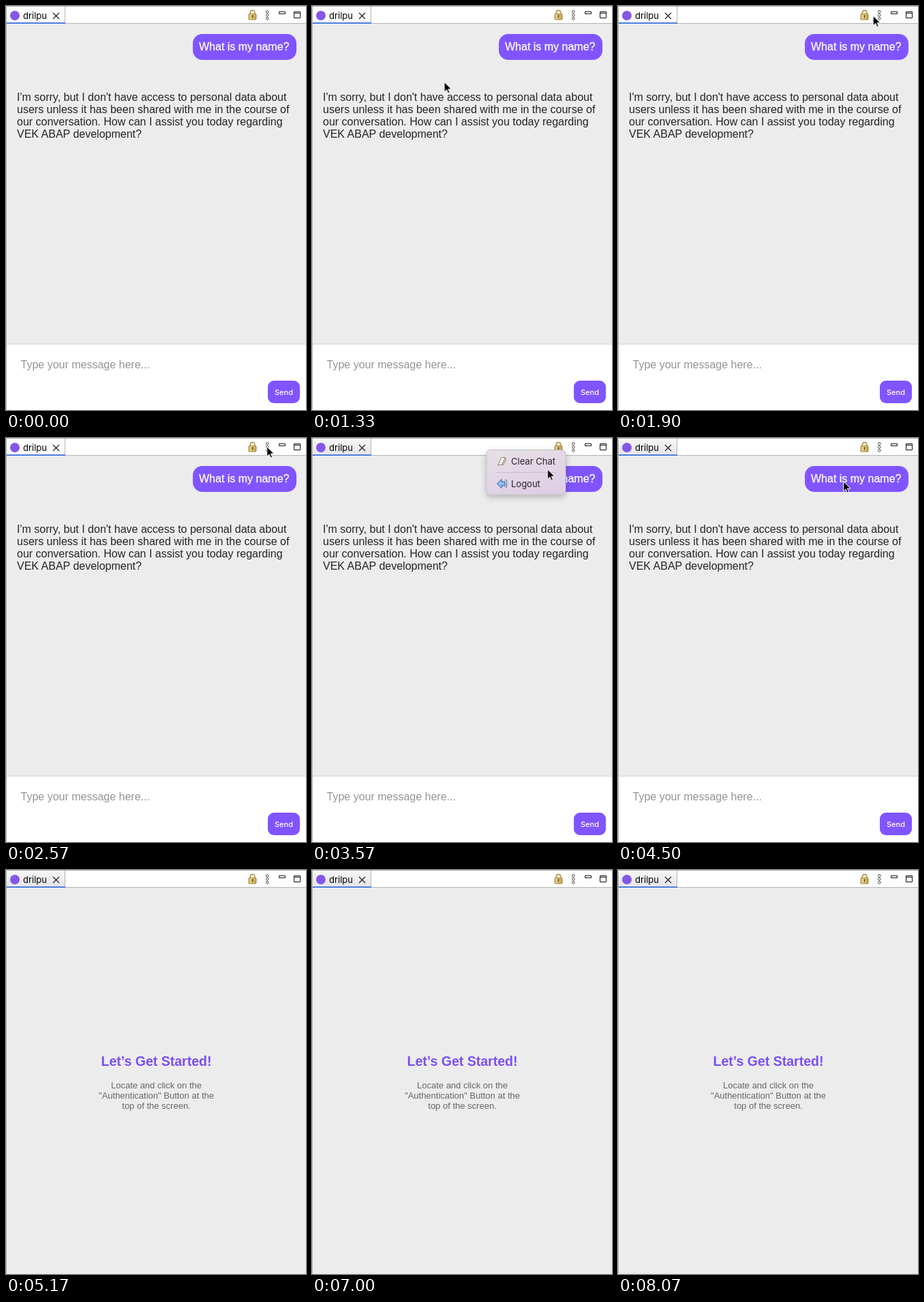
An HTML page that plays this animation: 440 px wide and 592 px high, repeating every 8560 ms.

```html
<!DOCTYPE html>
<html lang="en">
<head>
<meta charset="utf-8">
<title>Chat logout</title>
<style>
html, body { margin: 0; width: 100%; height: 100%; overflow: hidden; background: #ececec; }
svg { display: block; width: 440px; height: 592px; }
text { font: 16px "Liberation Sans", Arial, sans-serif; }
.ui { font: 13px Inter, sans-serif; }
.send { font: 500 11px Inter, sans-serif; }
.title { font-weight: bold; font-size: 19.5px; }
.hint { font-size: 13px; }
.mid { text-anchor: middle; }

.timed { animation: 8560ms step-end infinite; }
.chat { animation-name: chat; }
.start { animation-name: start; }
.tab { animation-name: tab; }
.menu { animation-name: menu; }
.hover-clear { animation-name: hover-clear; }
.hover-logout { animation-name: hover-logout; }
.cursor { animation: move 8560ms linear infinite, fade 8560ms linear infinite; }

@keyframes chat { 0% { opacity: 1; } 52.92%, 100% { opacity: 0; } }
@keyframes start { 0% { opacity: 0; } 52.92%, 100% { opacity: 1; } }
@keyframes tab { 0% { opacity: 0; } 31.893%, 100% { opacity: 1; } }
@keyframes menu {
  0% { opacity: 0; }
  33.53% { opacity: 1; }
  48.25% { opacity: 1; animation-timing-function: ease-out; }
  50.23%, 100% { opacity: 0; }
}
@keyframes hover-clear {
  0% { opacity: 0; }
  37.38% { opacity: 1; }
  41.12%, 100% { opacity: 0; }
}
@keyframes hover-logout {
  0% { opacity: 0; }
  42.52% { opacity: 1; }
  46.73% { opacity: 0; }
  47.43%, 100% { opacity: 1; }
}
@keyframes move {
  0%, 11.682% { transform: translate(-14px, 201px); }
  15.537% { transform: translate(193px, 111px); }
  18.692% { transform: translate(305px, 60px); }
  21.379% { transform: translate(364px, 24px); animation-timing-function: ease-out; }
  24.065% { transform: translate(385px, 1px); animation-timing-function: ease-in-out; }
  27.453%, 35.631% { transform: translate(382px, 12px); }
  39.136% { transform: translate(362px, 33px); }
  41.706% { transform: translate(345px, 45px); animation-timing-function: ease-out; }
  43.224%, 100% { transform: translate(330px, 63px); }
}
@keyframes fade { 0%, 53.738% { opacity: 1; } 56.075%, 100% { opacity: 0; } }
</style>
</head>
<body>
<svg viewBox="0 0 440 592">
  <defs>
    <linearGradient id="tabFill" x2="0" y2="1">
      <stop stop-color="#f6f6f6"/><stop offset="1" stop-color="#e5e5e7"/>
    </linearGradient>
    <linearGradient id="gold" x2="1">
      <stop stop-color="#d8bd6c"/><stop offset=".4" stop-color="#e8d18a"/><stop offset="1" stop-color="#c09f4c"/>
    </linearGradient>
    <linearGradient id="menuFill" x2=".5" y2="1">
      <stop stop-color="#e7e1e6"/><stop offset="1" stop-color="#dfcfe5"/>
    </linearGradient>
    <filter id="shadow" x="-20%" y="-25%" width="140%" height="160%">
      <feDropShadow dx="0" dy="3" stdDeviation="4" flood-opacity=".25"/>
    </filter>
    <g id="clear">
      <path d="M272.5 39.5 278 28.5h5.5L278.5 39.5z" fill="#f7f3ea" stroke="#8b8378"/>
      <path d="M278.5 39.5 283.5 28.5 285 31 280.5 39.5z" fill="#cfc4ae" stroke="#8b8378" stroke-width=".7"/>
      <text class="ui" x="292" y="39">Clear Chat</text>
    </g>
    <g id="logout">
      <path d="M271.5 67 278 60.5v3.500h5v6h-5v3.500z" fill="#8dbcf0" stroke="#2f5fa5"/>
      <path d="M283 61.5h2.500v10.500h-2.500" fill="none" stroke="#62799c"/>
      <text class="ui" x="292" y="72">Logout</text>
    </g>
  </defs>

  <rect width="440" height="592" fill="#ececec"/>

  <g class="timed chat">
    <rect x="274" y="41" width="152" height="38" rx="14" fill="#8055ff"/>
    <text x="283" y="65" fill="#fff" stroke="#fff" stroke-width=".3">What is my name?</text>
    <g fill="#242424">
      <text x="16" y="139">I'm sorry, but I don't have access to personal data about</text>
      <text x="16" y="157">users unless it has been shared with me in the course of</text>
      <text x="16" y="175">our conversation. How can I assist you today regarding</text>
      <text x="16" y="193">VEK ABAP development?</text>
    </g>
    <rect y="495" width="440" height="97" fill="#fff"/>
    <path d="M0 495.5h440" stroke="#d2d2d2"/>
    <text x="21.5" y="531" fill="#949494">Type your message here...</text>
    <rect x="384" y="549" width="47" height="33" rx="9" fill="#8055ff"/>
    <text class="send mid" x="407.5" y="570" fill="#fff">Send</text>
  </g>

  <g class="timed start">
    <text class="title mid" x="220.5" y="287" fill="#7b4ff0">Let’s Get Started!</text>
    <g fill="#666">
      <text class="hint mid" x="220.5" y="320">Locate and click on the</text>
      <text class="hint mid" x="220.5" y="335">"Authentication" Button at the</text>
      <text class="hint mid" x="220.5" y="350">top of the screen.</text>
    </g>
  </g>

  <!-- Tab bar -->
  <rect width="440" height="26" fill="#fff"/>
  <rect class="timed tab" x="1" y="1" width="85" height="24" fill="url(#tabFill)"/>
  <path d="M0 .5h440M.5 0v592M86.5 1v24M87 25.5h353" stroke="#b3b3b3"/>
  <path d="M1 25h86" stroke="#4b7fe0" stroke-width="2"/>
  <circle cx="13" cy="14" r="7" fill="#8457e8"/>
  <text class="ui" x="25" y="18.5" fill="#000">drilpu</text>
  <path d="M69 10l9 9m0-9l-9 9" stroke="#222" stroke-width="1.300"/>
  <path d="M358.3 12.500v-3a3.200 3.200 0 0 1 6.400 0v3" fill="none" stroke="#b79a50" stroke-width="1.800"/>
  <rect x="356" y="11.5" width="11" height="8.500" rx="1" fill="url(#gold)" stroke="#a08340"/>
  <path d="M361.5 13.5v4.500" stroke="#5c4a1c" stroke-width="1.200"/>
  <circle cx="361.5" cy="14.500" r="1.100" fill="#5c4a1c"/>
  <g fill="#fff" stroke="#444">
    <circle cx="383.3" cy="8.300" r="1.800"/>
    <circle cx="383.3" cy="13.300" r="1.800"/>
    <circle cx="383.3" cy="18.300" r="1.800"/>
  </g>
  <g fill="#fff" stroke="#111">
    <path d="M400.5 8.500h9v3h-9z"/>
    <path d="M422.5 8.500h9v9h-9zM422.5 10.500h9"/>
  </g>

  <g class="timed menu" fill="#242424">
    <rect x="256" y="17.500" width="116" height="65.500" rx="6" fill="url(#menuFill)" stroke="#bfb5c1" stroke-width=".8" filter="url(#shadow)"/>
    <path d="M270 50.500h88" stroke="#c9bdcc"/>
    <use href="#clear"/>
    <use href="#logout"/>
    <g class="timed hover-clear" fill="#fff">
      <rect x="261" y="24" width="106" height="21" rx="4" fill="#4a86f0"/>
      <use href="#clear"/>
    </g>
    <g class="timed hover-logout" fill="#fff">
      <rect x="261" y="57" width="106" height="21" rx="4" fill="#4a86f0"/>
      <use href="#logout"/>
    </g>
  </g>

  <path class="cursor" d="M.7 .8v14.200l3.300-3.100 2.200 5 2.400-1-2.200-4.900h4.600z" fill="#000" stroke="#fff" stroke-linejoin="round"/>
</svg>
</body>
</html>
```
